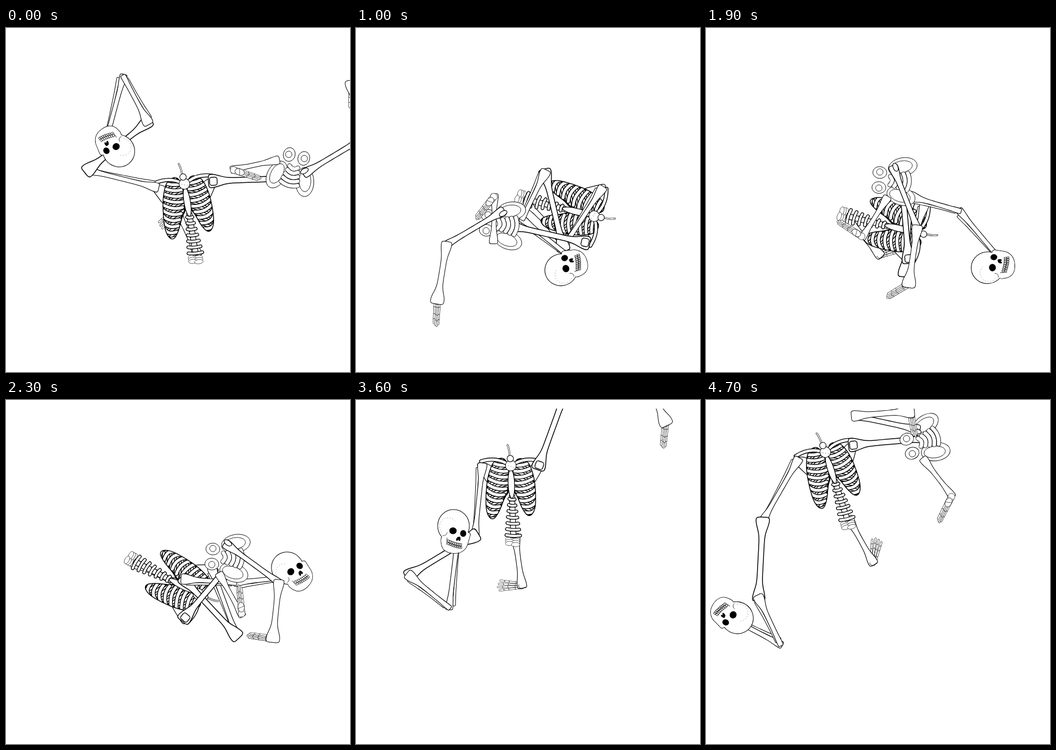
Recreate the animation shown at these times as an HTML page with a canvas. Size 640x640 px, loop 4800 ms.

```html
<!DOCTYPE html>
<html>
<head>
<meta charset="utf-8">
<style>
html, body { margin: 0; width: 100%; height: 100%; overflow: hidden; background: #fff; }
canvas { display: block; }
</style>
</head>
<body>
<canvas id="stage" width="640" height="640"></canvas>
<script>
const c = document.getElementById('stage').getContext('2d');
const LOOP = 4800, STEP = 100, TOP = 16, SAG = 80;

// Key poses: place of the chest, then the direction of every bone along each limb.
const poses = [
  { t: 0, at: [332, 290], body: [-7], arm: [194, -39, 242, 105, 142], hip: [-2, 195], leg: [168, 18], limb: [-31, -99, 91], tail: [245, 130] },
  { t: 600, at: [457, 295], body: [117], arm: [109, 205, 186, -15, -84], hip: [171, 100], leg: [-18, 103], limb: [188, 98, 80], tail: [25, 20] },
  { t: 1500, at: [426, 241], body: [92], arm: [142, -39, 29, 106, -146], hip: [220, 93], leg: [183, 161], limb: [101, 101, 110], tail: [72, -60] },
  { t: 2300, at: [358, 361], body: [119], arm: [70, 227, 4, -6, -48], hip: [-50, 94], leg: [61, -95], limb: [36, 96, 188], tail: [25, 15] },
  { t: 2800, at: [314, 302], body: [-68], arm: [-82, 32, 217, 155, 25], hip: [159, 88], leg: [-13, 170], limb: [4, 84, 13], tail: [178, 90] },
  { t: 3600, at: [288, 122], body: [0], arm: [96, 149, 39, -83, 0], hip: [-70, 180], leg: [-45, -45], limb: [-11, 65, 96], tail: [82, 180] },
  { t: 4700, at: [222, 97], body: [-16], arm: [120, 93, 65, 208, 120], hip: [-5, 69], leg: [52, 117], limb: [192, -5, 80], tail: [61, -80] }
];

const rad = d => d * Math.PI / 180;
// Moves p by the offset [x, y] turned by d degrees.
function from(p, [x, y], d) {
  const s = Math.sin(rad(d)), k = Math.cos(rad(d));
  return [p[0] + x * k - y * s, p[1] + x * s + y * k];
}
function put(p, deg, draw, ...args) {
  c.save();
  c.translate(...p);
  c.rotate(rad(deg));
  draw(...args);
  c.restore();
}

function ink(lw, fill = '#fff') {
  c.lineWidth = lw;
  c.strokeStyle = '#000';
  if (fill) { c.fillStyle = fill; c.fill(); }
  if (lw) c.stroke();
}
// Closed outline, smoothed through the midpoints of its points.
function trace(pts) {
  const n = pts.length, mid = i => [0, 1].map(k => (pts[i % n][k] + pts[(i + 1) % n][k]) / 2);
  c.beginPath();
  c.moveTo(...mid(0));
  for (let i = 1; i <= n; i++) c.quadraticCurveTo(...pts[i % n], ...mid(i));
  c.closePath();
}
function blob(pts, lw, fill) {
  trace(pts);
  ink(lw, fill);
}
function oval(x, y, rx, ry, lw, fill, tilt = 0) {
  c.beginPath();
  c.ellipse(x, y, rx, ry, tilt, 0, 7);
  ink(lw, fill);
}
function line(x0, y0, x1, y1, lw) {
  c.beginPath();
  c.moveTo(x0, y0);
  c.lineTo(x1, y1);
  ink(lw, null);
}
// Curved bar with a black rim and round ends.
function bar(x0, y0, mx, my, x1, y1, w, lw) {
  c.beginPath();
  c.moveTo(x0, y0);
  c.quadraticCurveTo(mx, my, x1, y1);
  c.lineCap = 'round';
  c.lineWidth = w; c.strokeStyle = '#000'; c.stroke();
  c.lineWidth = w - 2 * lw; c.strokeStyle = '#fff'; c.stroke();
  c.lineCap = 'butt';
}

// Long bone: a thin shaft that flares to half widths a and b and ends in two knuckles.
function bone(len, a, mid, b, lw) {
  const edge = s => Array.from({ length: 13 }, (_, i) => {
    const x = len * i / 12, near = d => Math.exp(-((d / 17) ** 2));
    return [x, s * (mid + (a - mid) * near(x) + (b - mid) * near(len - x))];
  });
  const knuckles = (x, h, s) => [[x, s * h], [x * 1, s * h * .2], [x, -s * h]];
  blob([...edge(1), ...knuckles(len + b * .55, b * .9, 1), ...edge(-1).reverse(), ...knuckles(-a * .55, a * .9, -1)], lw);
}
function pair(len, a, b) {
  put([6, 8], -3, bone, len - 14, 3, 2, 3, 1);
  bone(len, a, 4, b, 1.1);
}
function humerus(len, socket) {
  bone(len, 13, 5, 12, 1.5);
  if (!socket) return;
  c.beginPath();
  c.roundRect(-5, -7, 14, 15, 4);
  ink(1.4);
}
function thigh(len) {
  bone(len, 9, 4.5, 7, 1.3);
  oval(0, -4, 8, 4.5, 1.2);
}
function tailBone(len) {
  bone(len, 9, 4.5, 9, 1.1);
  c.beginPath();
  c.arc(len, 0, 6, -1, 2);
  ink(.8, null);
}
// Four jointed fingers; spread fans them out.
function hand(len, spread) {
  for (let i = 0; i < 4; i++) {
    const a = (i - 1.5) * 3, b = a * spread, e = len - Math.abs(i - 1.2) * 3;
    bar(3, a, len / 2, (a + b) / 2, e, b, 3.8, .6);
    for (const k of [.28, .58, .8]) {
      const y = a + (b - a) * k;
      line(e * k, y - 1.9, e * k + 1, y + 1.9, .7);
    }
  }
  oval(2, 0, 6, 6.5, .6);
}
function foot(len) {
  hand(len, .8);
  oval(14, 0, 9, 6, .7);
  line(12, -6, 16, 6, .6);
}

function skull() {
  c.translate(-8, -20);
  const jaw = [[-22, 4], [34, 0], [29, 17], [25, 32], [12, 42], [-10, 41], [-22, 30]];
  for (const lw of [2, 0]) {
    blob(jaw, lw);
    oval(1, -9, 29, 30, lw);
  }
  blob(jaw, 0);
  oval(0, 0, 6.8, 6.3, 0, '#000');
  oval(19, 5, 5.6, 6.3, 0, '#000');
  oval(8.5, 15, 2, 4, 0, '#000', .5);
  oval(12, 15, 2, 4, 0, '#000');
  for (let i = 0; i < 8; i++) {
    const x = -10 + i * 3.3, y = 17 + 7 * Math.sin(i / 5);
    c.beginPath();
    c.rect(x, y, 3, 4.5);
    c.rect(x + .3, y + 5, 2.8, 4);
    ink(.8);
  }
  line(-11, 13, -12, 26, .8);
  c.beginPath();
  c.arc(-17, 3, 6, 0, 2);
  ink(.7, null);
  c.setLineDash([1, 4]);
  c.beginPath();
  c.arc(-9, -8, 16, 2.4, 5.6);
  ink(.6, null);
  c.setLineDash([]);
}

// One half of the rib cage: slanted bars cut to a closed outline.
function ribs(s) {
  trace([[6, -14], [30, -12], [42, 18], [46, 55], [45, 88], [34, 102], [22, 86], [12, 58], [3, 48]]
    .map(([x, y]) => [s * x, y - (s > 0 ? y * .06 : 0)]));
  ink(3);
  c.save();
  c.clip();
  for (let i = 0; i < 11; i++) bar(0, i * 10 - 18, s * 20, i * 10 - 12, s * 48, i * 10 + 6, 5, 1.4);
  for (let i = 9; i >= 0; i--) {
    const y = i * 11 - 10, inner = 5 + Math.max(0, i - 3) * 4;
    bar(s * inner, y + 9, s * (inner + 20), y + 13, s * 48, y - 3, 8, 1.4);
  }
  c.restore();
}
function chest() {
  for (const s of [-1, 1]) blob([[s * 66, -8], [s * 56, 12], [s * 38, 42], [s * 28, 0]], 1.2);
  for (const s of [-1, 1]) ribs(s);
  for (let i = 0; i < 7; i++) {
    const y = 63 + i * 11.2, x = y * .035, w = 5 + i * 1.3;
    c.beginPath();
    c.rect(x - 5, y - 8, 10, 12);
    ink(1.2);
    bar(x - w, y - 1, x, y + 2, x + w, y, 6.6, 1.3);
  }
  for (const s of [-1, 1]) bar(s * 8, -4, s * 28, -16, s * 55, -8, 7.5, 1.4);
  oval(1, 34, 6, 27, 1.3, '#fff', -.04);
  oval(0, 0, 10, 10, 1);
  bar(-2, -17, -3, -32, -6, -38, 3.2, .7);
  oval(-1, -13, 6, 6, 1.1);
  c.setLineDash([1, 4]);
  line(-5, 0, 5, 4, .8);
  c.setLineDash([]);
}
function sacrum() {
  for (let i = 0; i < 6; i++) oval(i % 2 * 11 - 2, 137 + i * 2, 8, 4, .6);
}
function pelvis() {
  for (const s of [-1, 1]) {
    oval(s * 14, 42, 11, 13, .9);
    oval(s * 15, 42, 6, 6, .8);
    oval(s * 27, 0, 17, 27, .9, '#fff', s * .25);
    oval(s * 27, 2, 11, 20, .8, '#fff', s * .25);
  }
  for (let i = 0; i < 5; i++) {
    const y = 22 - i * 8, w = 8 + i * 2;
    bar(-w, y, 0, y - 8, w, y, 8.5, .9);
  }
}

function poseAt(t) {
  const i = Math.min(poses.findLastIndex(p => p.t <= t), poses.length - 2);
  const a = poses[i], b = poses[i + 1], u = (t - a.t) / (b.t - a.t);
  const near = d => ((d + 540) % 360 + 360) % 360 - 180;
  const blend = key => a[key].map((v, k) => v + u * (key === 'at' ? b[key][k] - v : near(b[key][k] - v)));
  const pose = Object.fromEntries(Object.keys(a).slice(1).map(key => [key, blend(key)]));
  pose.at[1] += 4 * u * (1 - u) * SAG;
  return pose;
}
// Joints along a limb.
function joints(start, angles, lens) {
  const list = [start];
  lens.forEach((len, i) => list.push(from(list[i], [len, 0], angles[i])));
  return list;
}

function draw(t) {
  const { at, body: [body], arm, hip, leg, limb, tail } = poseAt(t);
  const a = joints(from(at, [-53, 0], body), arm, [131, 143, 96, 124]);
  const h = joints(from(at, [52, 1], body), hip, [146]);
  const l = joints(from(h[1], [33, 26], hip[1]), leg, [85]);
  const d = joints(from(h[1], [-24, 17], hip[1]), limb, [120, 105]);
  const e = joints(from(at, [8, 132], body), tail, [92]);

  c.fillStyle = '#fff';
  c.fillRect(0, 0, 640, 640);
  c.save();
  c.beginPath();
  c.rect(0, TOP, 640, 640 - TOP);
  c.clip();
  c.lineJoin = 'round';
  put(e[1], tail[1], hand, 45, 2);
  put(e[0], tail[0], tailBone, 92);
  put(at, body, sacrum);
  put(at, body, chest);
  put(a[0], arm[0], pair, 131, 9, 8);
  put(a[1], arm[1], humerus, 143, false);
  put(a[3], arm[3], pair, 124, 7, 6);
  put(a[2], arm[2], pair, 96, 10, 5);
  put(a[4], arm[4], skull);
  put(h[0], hip[0], humerus, 146, true);
  put(h[1], hip[1], pelvis);
  put(l[0], leg[0], bone, 85, 8, 4, 7, 1);
  put(l[1], leg[1], foot, 55);
  put(d[0], limb[0], thigh, 120);
  put(d[2], limb[2], hand, 48, .9);
  put(d[1], limb[1], bone, 105, 10, 5, 13, 1);
  c.restore();
}

function tick() {
  draw(Math.floor(performance.now() % LOOP / STEP) * STEP);
  requestAnimationFrame(tick);
}
tick();
</script>
</body>
</html>
```
